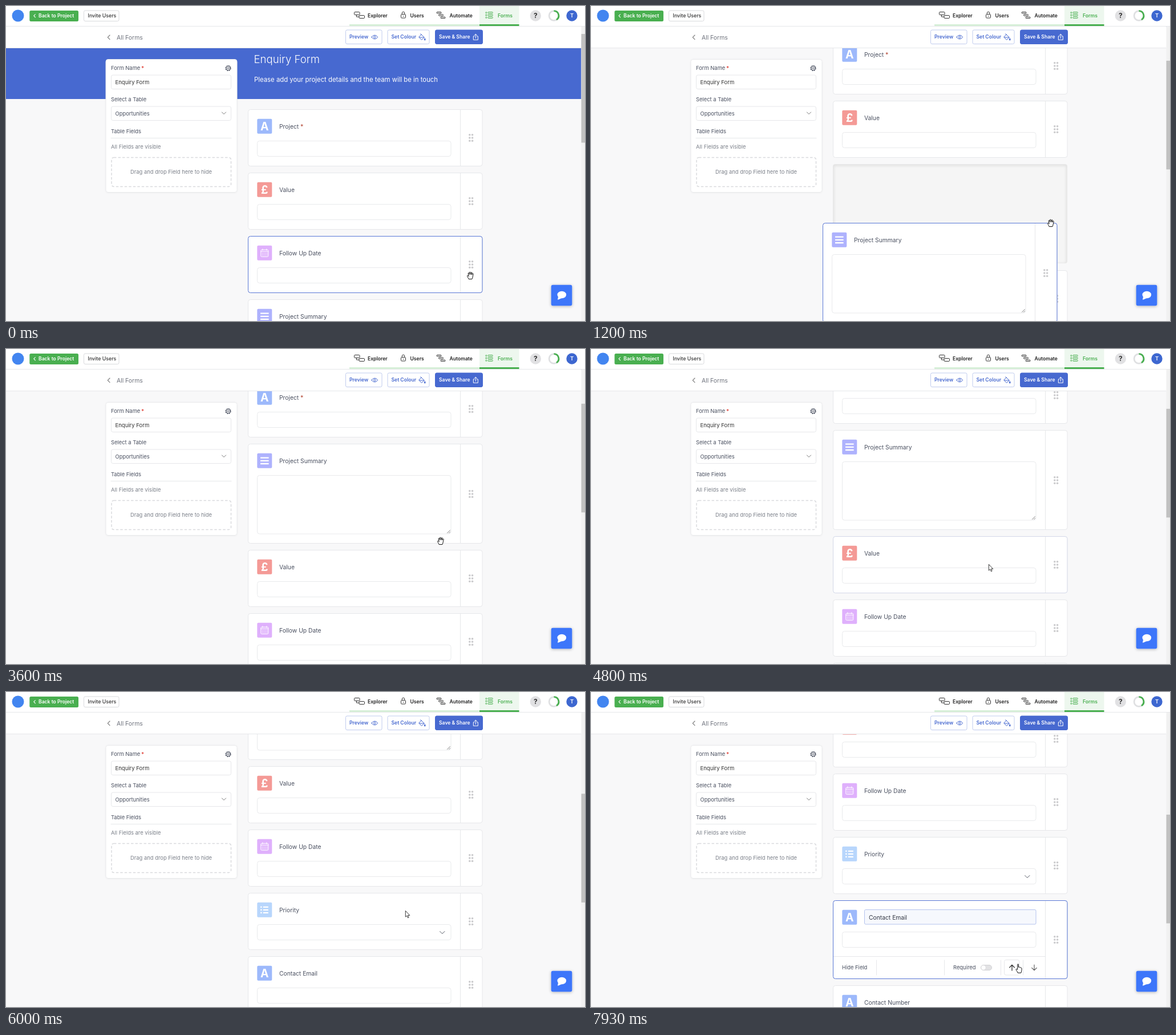
An HTML page that plays this animation: 1015 px wide and 552 px high, repeating every 8000 ms.

```html
<!DOCTYPE html>
<html lang="en">
<head>
<meta charset="utf-8">
<title>Form builder</title>
<style>
  html, body { margin: 0; width: 100%; height: 100%; overflow: hidden; background: #f8f8f9; }
  svg { display: block; width: 1015px; height: 552px; font-family: Inter, "Open Sans", sans-serif; }
  text { white-space: pre; }
</style>
</head>
<body>
<svg id="stage" viewBox="0 0 1015 552" xmlns="http://www.w3.org/2000/svg"></svg>
<script>
const BLUE = '#4769d0', RING = '#5a78d6', GREEN = '#49af50', INK = '#4a5060', LINE = '#e6e7ea';

const box = (x, y, w, h, r, fill, stroke = 'none', more = '') =>
  `<rect x="${x}" y="${y}" width="${w}" height="${h}" rx="${r}" fill="${fill}" stroke="${stroke}" ${more}/>`;
const text = (x, y, size, fill, str, weight = 400, more = '') =>
  `<text x="${x}" y="${y}" font-size="${size}" fill="${fill}" font-weight="${weight}" ${more}>${str}</text>`;
const path = (d, stroke, width = 1, fill = 'none', more = '') =>
  `<path d="${d}" stroke="${stroke}" stroke-width="${width}" fill="${fill}" stroke-linejoin="round" stroke-linecap="round" ${more}/>`;
const dot = (x, y, r, fill, more = '') => `<circle cx="${x}" cy="${y}" r="${r}" fill="${fill}" ${more}/>`;
const group = (id, body, more = '') => `<g id="${id}" ${more}>${body}</g>`;
const at = (x, y, body) => `<g transform="translate(${x} ${y})">${body}</g>`;

// Field icons, 26 x 26
const letter = (ch, size) => text(13, 13 + size * 0.363, size, '#fff', ch, 700, 'text-anchor="middle"');
const ICONS = {
  text: ['#9db9fb', letter('A', 19.5)],
  money: ['#f49a96', letter('£', 19.5)],
  date: ['#dfb0fc', box(6.5, 7.5, 13, 12, 1.5, 'none', '#fff') + path('M6.5 10.5H19.5M9.5 6V8.5M16.5 6V8.5', '#fff') +
    path('M9 13.2H17.5M9 15.2H17.5M9 17.2H17.5', '#fff', 1.1, 'none', 'stroke-dasharray="0.4 2.3"')],
  summary: ['#aeb2fd', path('M5.7 7.8H20.3M5.7 13H20.3M5.7 18.2H20.3', '#fff', 2.3, 'none', 'style="stroke-linecap:butt"')],
  list: ['#b8d6fc', path('M10.5 8H19.5M10.5 13H19.5M10.5 18H19.5', '#fff', 2.2, 'none', 'style="stroke-linecap:butt"') +
    [8, 13, 18].map(y => dot(7, y, 1.4, '#fff')).join('')]
};

const FIELDS = {
  project: ['Project', 'text', 100],
  value: ['Value', 'money', 100],
  date: ['Follow Up Date', 'date', 100],
  summary: ['Project Summary', 'summary', 175],
  priority: ['Priority', 'list', 100],
  email: ['Contact Email', 'text', 100],
  number: ['Contact Number', 'text', 100]
};

const grip = [-5.2, 0, 5.2].map(y => dot(-2.2, y, 1.8, '#cbcbcd') + dot(2.6, y, 1.8, '#cbcbcd')).join('');

function card(id) {
  const [label, icon, h] = FIELDS[id];
  const [tint, glyph] = ICONS[icon];
  const edge = (fill, stroke, more) => box(0.5, 0.5, 410.5, h - 1, 4, fill, stroke, more);
  let body = edge('#fff', LINE, 'class="frame"') +
    `<path class="divider" stroke="${LINE}"/>` +
    at(16.3, 16.8, box(0, 0, 26, 26, 2, tint) + glyph) +
    text(55, 33.7, 10.3, INK, label, 400, 'class="label"') +
    box(16.5, 55.5, 339.5, id === 'summary' ? 102.5 : 27, 4, '#fff', '#e9eaec') +
    `<g class="grip">${grip}</g>`;
  if (id === 'project') body += text(92, 34, 10.5, '#b85240', '*', 500);
  if (id === 'summary') body += path('M349.5 156.5L354.5 151.5M352.5 156.5L354.5 154.5', '#777', 0.9);
  if (id === 'priority') body += path('M336.5 67.5L340.8 71.5L345 67.5', '#999ca3', 1.1);
  if (id === 'email') body += group('editor',
    box(55.5, 16.5, 300.5, 25.5, 2, '#f6f8fd', '#b4c3ee') +
    text(63, 33.7, 10.3, '#333844', label) +
    path('M1 98.5H372.5M76.5 105V131M195.5 105V131M294.5 105V131M333.5 105V131', LINE) +
    text(16, 121.3, 9.4, INK, 'Hide Field') + text(211, 121.3, 9.4, INK, 'Required') +
    box(259.5, 113.5, 19, 9, 4.5, '#e2e2e4', '#d2d2d5') + dot(264, 118, 4.2, '#fff', 'stroke="#d0d0d4" stroke-width=".6"') +
    box(300.5, 104.5, 26.5, 26.5, 3, '#fff', LINE, 'id="upButton"') +
    path('M314 123V113.5M309.7 117.7L314 113.3L318.3 117.7', '#333', 1.3) +
    path('M353 113V122.5M348.7 118.3L353 122.7L357.3 118.3', '#555', 1.1));
  return group(id, body + edge('none', RING, 'class="ring"'));
}

const cursors = {
  grab: path('M-3 6.2C-3.8 3.8-6.2 1.4-5.3.5-4.6-.2-3.5.9-2.8 1.7L-3.8-3.1C-4-4.5-2.5-4.9-2.1-3.6L-1.4-1.4-1.5-4.9C-1.5-6.2.2-6.2.3-4.9L.6-1.5 1.4-4.6C1.7-5.8 3.2-5.5 3-4.2L2.5-1 3.6-2.8C4.3-3.8 5.6-3.1 5.1-1.9 4.2.5 4.6 3 3.1 6.2Z', '#111', 1, '#fff'),
  arrow: path('M-2.7-6.2V4.1L-.3 2 1.4 5.8 3.1 5 1.4 1.4H4.4Z', '#222', 0.9, '#fff'),
  point: path('M-2 7.8C-2.6 5.2-5.6 2.9-4.9 1.7-4.2.7-3 1.8-2.3 2.5V-6.2C-2.3-7.7-.5-7.7-.5-6.2V-1.6C.1-2.4 1.3-2.2 1.4-1.3 2-2 3.2-1.6 3.2-.7 4-1.1 5-.7 5 .4 5 3.3 4.8 5.3 4 7.8Z', '#111', 1, '#fff'),
  beam: path('M-2-5H-.5M2-5H.5M0-4.5V4.5M-2 5H-.5M2 5H.5', '#222', 1)
};

const button = (x, w, label, ink, fill, stroke) =>
  box(x + 0.5, 42, w - 1, 24.5, 2.5, fill, stroke) + text(x + 7, 57.3, 8.6, ink, label, 600);

const banner = box(0, 60, 1008.5, 103, 0, BLUE) +
  text(434.5, 99.5, 18.6, '#fff', 'Enquiry Form', 300) +
  text(435, 133, 11.35, '#fff', 'Please add your project details and the team will be in touch');

const panel = box(175, 93.5, 230, 233, 4, '#fff', '#e9eaec', 'filter="url(#soft)"') +
  text(184, 112.3, 9.4, INK, 'Form Name') + text(237, 112.5, 10, '#e0453c', '*', 500) +
  dot(389.5, 109, 4, 'none', `stroke="${INK}" stroke-width="2.2" stroke-dasharray="1.8 1.34"`) +
  dot(389.5, 109, 3.7, '#fff', `stroke="${INK}"`) + dot(389.5, 109, 1.5, '#fff', `stroke="${INK}" stroke-width=".9"`) +
  box(184.5, 121, 210, 24.5, 3, '#fff', LINE) + text(191.5, 136.7, 9.5, '#333', 'Enquiry Form') +
  text(184, 167.3, 9.4, INK, 'Select a Table') +
  box(184.5, 176, 210, 24.5, 3, '#fff', LINE) + text(191.5, 191.7, 9.4, INK, 'Opportunities') +
  path('M378.5 186L382 189.5L385.5 186', '#777', 1) +
  text(184, 222.5, 9.4, INK, 'Table Fields') + path('M184 231.5H395', LINE) +
  text(184, 250.3, 9.4, '#7c808a', 'All Fields are visible') +
  box(185, 265.5, 209.5, 51, 4, '#fff', '#d9dadd', 'stroke-width="1.5" stroke-dasharray="4.5 3"') +
  text(289.5, 294.3, 9.4, '#7c808a', 'Drag and drop Field here to hide', 400, 'text-anchor="middle"');

const toolbar = box(0, 35, 1008.5, 38.5, 0, '#fff') + path('M0 73.5H1008', '#e6e7ea') +
  path('M182 51L178.3 54.8L182 58.6', '#777', 1.1) + text(194, 58.7, 10.4, '#70747e', 'All Forms') +
  button(595, 64.5, 'Preview', BLUE, '#fff', '#c0ccee') +
  path('M640.8 54.5Q646.3 47.5 651.8 54.5Q646.3 61.5 640.8 54.5Z', BLUE) + dot(646.3, 54.5, 1.7, 'none', `stroke="${BLUE}"`) +
  button(668.5, 74, 'Set Colour', BLUE, '#fff', '#c0ccee') +
  path('M728.3 50.2L733.2 54.9L728.6 59.4L724 54.7ZM724.5 55H733M728.3 50.2L726.7 48.7', BLUE) +
  path('M734.2 56.6Q736.6 60 734.2 60Q731.9 60 734.2 56.6Z', BLUE, 0.6, BLUE) +
  button(752, 84, 'Save &amp; Share', '#fff', BLUE, BLUE) +
  path('M821 53H819.3V59.3H827.3V53H825.6M823.3 56.5V49.3M821 51.5L823.3 49.2L825.6 51.5', '#fff');

const header = box(0, 0, 1015, 35, 0, '#fff') + path('M0 35.5H1015', '#e6e7ea') +
  dot(21, 17, 10.5, '#4285f0') +
  box(41.3, 8, 85.7, 19, 2.5, GREEN) + path('M51.3 14.5L48.8 17.2L51.3 19.9', '#fff', 1.1) +
  text(57, 20.2, 8.6, '#fff', 'Back to Project', 600) +
  box(136.5, 8, 61.5, 18.5, 2.5, '#fff', '#d9dadd') + text(143.5, 20.4, 8.8, '#333', 'Invite Users', 500) +
  box(602, 32, 228, 3, 0, '#d6efd8') + box(830, 0, 69.5, 35, 0, '#edf7ee') + box(830, 32, 69.5, 3, 0, GREEN) +
  box(610.5, 10.5, 9.5, 5, 1.2, '#fff', '#333') + box(619, 16.5, 9.5, 5, 1.2, '#fff', '#333') + path('M614.5 16V19H619', '#333') +
  text(634, 19.7, 8.6, '#222', 'Explorer', 600) +
  box(692.5, 14.5, 8, 6.5, 1.2, '#fff', '#333') + path('M694.3 14V12.4A2.2 2.2 0 0 1 698.7 12.4V14', '#333') + dot(696.5, 17.8, 0.8, '#333') +
  text(708.5, 19.7, 8.6, '#222', 'Users', 600) +
  box(755, 10.5, 8, 2.4, 1, '#fff', '#333') + box(758.5, 14.8, 8, 2.4, 1, '#fff', '#333') + box(762, 19.2, 8, 2.4, 1, '#fff', '#333') +
  text(777.5, 19.7, 8.6, '#222', 'Automate', 600) +
  [11.7, 16, 20.3].map(y => dot(841.8, y, 1.1, 'none', `stroke="${GREEN}" stroke-width=".9"`) +
    box(844.8, y - 1.2, 8.5, 2.4, 1, 'none', GREEN, 'stroke-width=".9"')).join('') +
  text(862, 19.7, 8.6, GREEN, 'Forms', 600) +
  dot(928.3, 17, 9.7, '#e1e1e3') + text(928.3, 21.3, 12, '#333', '?', 700, 'text-anchor="middle"') +
  dot(960.5, 17, 8.4, '#fff', 'stroke="#dfe0e2" stroke-width="2.8"') +
  path('M960.5 8.6A8.4 8.4 0 0 1 965 24.1', GREEN, 2.8, 'none', 'style="stroke-linecap:butt"') +
  dot(992, 17, 9.7, '#3d67d0') + text(992, 20.4, 9.4, '#fff', 'T', 600, 'text-anchor="middle"');

const chat = box(955.7, 488.7, 36.6, 36.6, 3, '#3d76fa', 'none', 'filter="url(#lift)"') +
  `<ellipse cx="974.3" cy="506" rx="7.8" ry="6.2" fill="#fff"/>` + path('M968.5 509.5L967.6 514.3L973 512Z', '#fff', 1, '#fff');

const shadow = (id, dy, blur, alpha) =>
  `<filter id="${id}" x="-30%" y="-30%" width="160%" height="160%"><feDropShadow dx="0" dy="${dy}" stdDeviation="${blur}" flood-opacity="${alpha}"/></filter>`;

const slot = box(0, 0, 411, 174, 4, '#f5f5f5') +
  box(0, 1, 411, 175, 4, 'none', '#dedede', 'stroke-width="4" filter="url(#blur)"');

document.getElementById('stage').innerHTML =
  `<defs>${shadow('soft', 0.5, 0.8, 0.06)}${shadow('lift', 1, 2.5, 0.3)}
   <filter id="blur"><feGaussianBlur stdDeviation="2"/></filter>
   <clipPath id="slotClip">${box(0, 0, 411, 174, 4, '#000')}</clipPath></defs>` +
  box(0, 0, 1015, 552, 0, '#f8f8f9') +
  group('banner', banner) + panel +
  group('slot', slot, 'clip-path="url(#slotClip)"') +
  Object.keys(FIELDS).filter(id => id !== 'summary').map(card).join('') + card('summary') +
  toolbar + box(1008.5, 35, 6.5, 517, 0, '#f1f1f1') + box(1008.5, 49, 6.5, 190.5, 0, '#c1c1c1', 'none', 'id="thumb"') +
  header + chat +
  group('cursor', Object.entries(cursors).map(([id, body]) => group(id, body)).join(''));

// Motion tables: [ms, value, ...]
const SCROLL = [[730, 0], [1070, 126], [4600, 126], [5400, 222], [6470, 446]];
const DRAG = [[600, 424, 514], [800, 418, 528], [1000, 410, 490], [1200, 406, 380], [1470, 406, 268],
  [1800, 406, 200], [2130, 406, 180], [2270, 424, 166]];
const MOUSE = [[0, 814, 472], [70, 815, 478], [400, 824, 527], [600, 824, 527], [800, 818, 541], [1000, 810, 485], [1200, 806, 380],
  [1470, 806, 274], [1800, 806, 213], [2130, 806, 193], [2930, 806, 193], [3270, 855, 250], [3600, 762, 336],
  [3800, 698, 376], [3930, 697, 378], [4600, 697, 378], [5000, 703, 390], [6330, 703, 390], [6540, 689, 416],
  [6730, 560, 393], [7330, 560, 393], [7470, 590, 412], [7870, 750, 484]];
const HOVER = [[-200, 'date'], [270, 'summary'], [3070, ''], [3650, 'value'], [4670, ''], [6460, 'email']];
const CURSOR = [[0, 'grab'], [3860, 'arrow'], [6450, 'point'], [6650, 'beam'], [7460, 'point']];
const ORDER = [
  [0, 'project value date summary priority email number'],
  [1070, 'project value summary date priority email number'],
  [1590, 'project summary value date priority email number']];
const OPEN = 6860, DRAG_FROM = 660, DRAG_TO = 2260, FADE = 150;

const step = (table, t) => table.filter(row => row[0] <= t).pop()[1];

function tween(table, t) {
  const i = table.findIndex(row => row[0] > t);
  if (i < 1) return table[i < 0 ? table.length - 1 : 0].slice(1);
  const a = table[i - 1], b = table[i], k = (t - a[0]) / (b[0] - a[0]);
  return a.slice(1).map((v, j) => v + (b[j + 1] - v) * k);
}

// Hover outline strength: the new card fades in while the last fades out
function glow(id, t) {
  const past = HOVER.filter(row => row[0] <= t), [start, now] = past.pop(), last = past.pop();
  const k = Math.min(1, (t - start) / FADE);
  return id === now ? k : last && id === last[1] ? 1 - k : 0;
}

const $ = id => document.getElementById(id);
const move = (node, x, y) => node.setAttribute('transform', `translate(${Math.round(x)} ${Math.round(y)})`);
const show = (node, on) => node.setAttribute('visibility', on ? 'visible' : 'hidden');

function draw(t) {
  const [scroll] = tween(SCROLL, t), [mx, my] = tween(MOUSE, t);
  const dragging = t >= DRAG_FROM && t < DRAG_TO, open = t >= OPEN;

  let y = 181 - scroll;
  for (const id of step(ORDER, t).split(' ')) {
    const node = $(id), part = name => node.querySelector('.' + name);
    const h = id === 'email' && open ? 138 : FIELDS[id][2];
    if (id === 'summary' && dragging) {
      move($('slot'), 424, y);
      move(node, ...tween(DRAG, t));
    } else move(node, 424, y);
    part('frame').setAttribute('height', h - 1);
    part('ring').setAttribute('height', h - 1);
    part('ring').setAttribute('opacity', glow(id, t));
    part('divider').setAttribute('d', `M372.5 1V${h - 1}`);
    move(part('grip'), 391, h / 2);
    y += h + 11;
  }

  show($('slot'), dragging);
  show($('editor'), open);
  show($('email').querySelector('.label'), !open);
  show($('upButton'), open && t > 7780);
  move($('banner'), 0, -scroll);
  $('thumb').setAttribute('y', 49 + scroll * 0.372);

  const kind = step(CURSOR, t);
  for (const id in cursors) $(id).setAttribute('display', id === kind ? 'inline' : 'none');
  move($('cursor'), mx, my);
}

const LOOP = 8000, TICK = 1000 / 15;
function play(now) {
  draw(Math.floor((now % LOOP) / TICK + 0.1) * TICK);
  requestAnimationFrame(play);
}
draw(0);
requestAnimationFrame(play);
</script>
</body>
</html>
```
